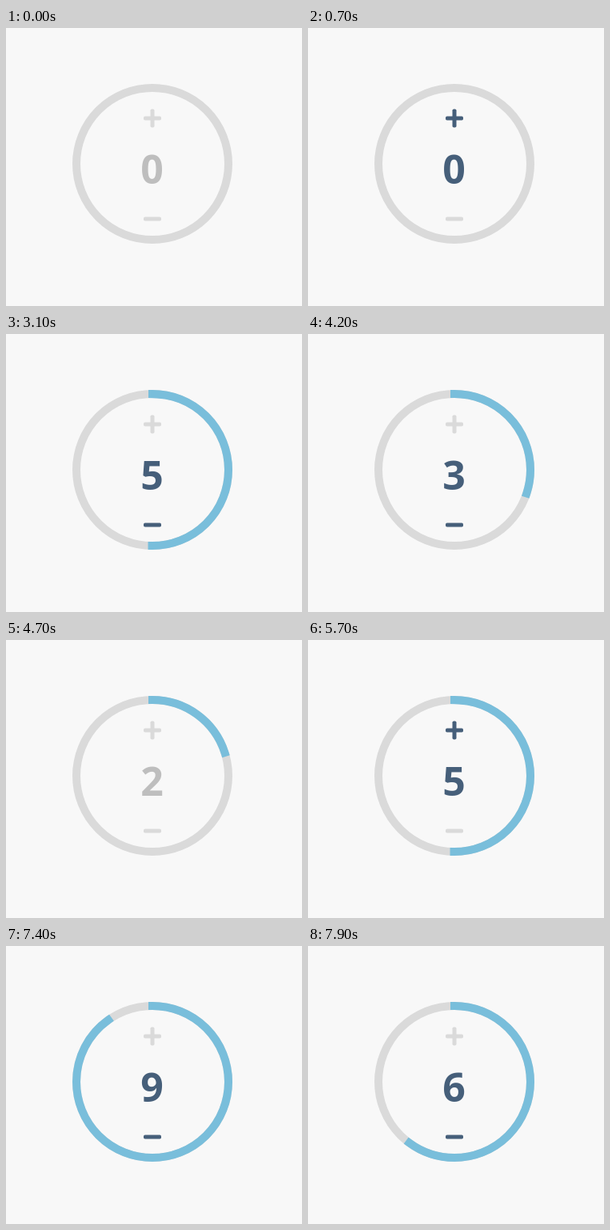
An HTML page for the animation above (8 s loop, 370 px wide and 348 px high).

```html
<!DOCTYPE html>
<html lang="en">
<head>
<meta charset="utf-8">
<title>Ring stepper</title>
<style>
  html, body { margin: 0; width: 100%; height: 100%; overflow: hidden; background: #f8f8f8; }
  svg { display: block; width: 370px; height: 348px; }
  text { font: 700 50px "Open Sans", "Noto Sans", sans-serif; text-anchor: middle; }
</style>
</head>
<body>
<svg viewBox="0 0 370 348">
  <rect width="370" height="348" fill="#f8f8f8"/>
  <g fill="none" stroke-width="10">
    <circle cx="183" cy="170" r="95" stroke="#dadada"/>
    <circle id="arc" cx="183" cy="170" r="95" stroke="#79bedb"
            stroke-linecap="square" transform="rotate(-90 183 170)"/>
  </g>
  <g id="plus">
    <rect x="172" y="110.5" width="22" height="5" rx="1.8"/>
    <rect x="180.5" y="101.5" width="5" height="23" rx="1.8"/>
  </g>
  <rect id="minus" x="172" y="236.5" width="22" height="5" rx="1.8"/>
  <text id="value" x="182.4" y="195"></text>
</svg>
<script>
  const LOOP = 8000, FRAME = 100, FADE = 200, MAX = 10, TURN = 2 * Math.PI * 95;
  const DARK = [70, 95, 122], PALE = [218, 218, 218], MUTED = [190, 190, 190];
  const $ = id => document.getElementById(id);
  const arc = $("arc"), plus = $("plus"), minus = $("minus"), value = $("value");

  // The pointer enters a button, clicks it in a burst, then leaves
  const visits = [
    { step: 1, clicks: 5, enter: 200, first: 1100, last: 2300, leave: 2500, pace: 0.7 },
    { step: -1, clicks: 3, enter: 3100, first: 3800, last: 4400, leave: 4600, pace: 0.7 },
    { step: 1, clicks: 8, enter: 5000, first: 5400, last: 6400, leave: 6700, pace: 1.1 },
    { step: -1, clicks: 4, enter: 6700, first: 7400, last: 7900, leave: LOOP, pace: 0.7 },
  ];

  const snap = t => Math.round(t / FRAME) * FRAME;

  function clicked({ clicks, first, last, pace }, t) {
    let n = 0;
    while (n < clicks && snap(first + (last - first) * (n / (clicks - 1)) ** pace) <= t) n++;
    return n;
  }

  function glow({ enter, leave }, t) {
    if (t < enter) return 0;
    if (t < leave) return 1;
    const gone = Math.floor((t - leave) / FRAME + 1) * FRAME;
    return Math.max(0, 1 - gone / FADE);
  }

  const strongest = (list, t) => Math.max(...list.map(v => glow(v, t)));
  const mix = (from, k) => `rgb(${from.map((c, i) => Math.round(c + (DARK[i] - c) * k))})`;

  function draw(t) {
    const n = visits.reduce((sum, v) => sum + v.step * clicked(v, t), 0);
    arc.style.display = n ? "" : "none";
    arc.setAttribute("stroke-dasharray", `${TURN * n / MAX} ${TURN * 2}`);
    plus.setAttribute("fill", mix(PALE, strongest(visits.filter(v => v.step > 0), t)));
    minus.setAttribute("fill", mix(PALE, strongest(visits.filter(v => v.step < 0), t)));
    value.setAttribute("fill", mix(MUTED, strongest(visits, t)));
    value.textContent = n;
  }

  const start = performance.now();
  function tick() {
    draw((performance.now() - start) % LOOP);
    requestAnimationFrame(tick);
  }
  tick();
</script>
</body>
</html>
```
